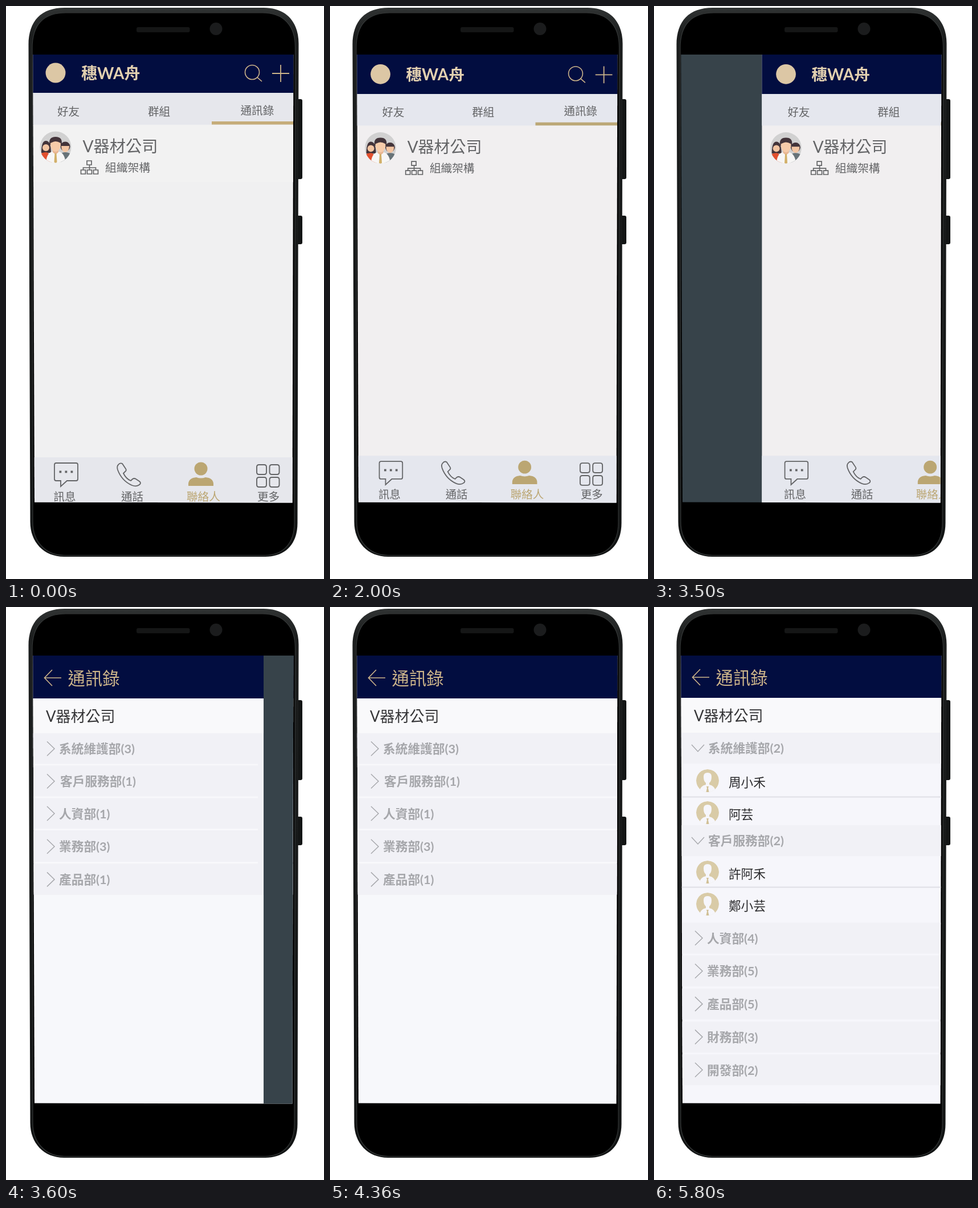
These frames come from a looping animation (558x1003 px, 6800 ms). An HTML page:

```html
<!DOCTYPE html>
<html lang="zh-Hant">
<head>
<meta charset="utf-8">
<title>通訊錄</title>
<style>
html, body { margin: 0; width: 100%; height: 100%; overflow: hidden; background: #fff; }
svg { display: block; width: 558px; height: 1003px; }
text { font-family: Lato, "Noto Sans CJK TC", "Noto Sans CJK", sans-serif; }
</style>
</head>
<body>
<svg viewBox="0 0 558 1003">
  <defs>
    <clipPath id="glass"><path d="M47.3 85H504.3L502.5 869.5L50 868.5Z"/></clipPath>
    <clipPath id="round"><circle cx="87" cy="247" r="27.5"/></clipPath>
    <clipPath id="badge"><circle r="20"/></clipPath>
    <linearGradient id="rim" x2="0" y2="1">
      <stop offset="0" stop-color="#303333"/>
      <stop offset=".05" stop-color="#1c1e1e"/>
      <stop offset="1" stop-color="#121414"/>
    </linearGradient>
  </defs>
  <path d="M510 163H517Q520 163 520 166V300Q520 303 517 303H510ZM510 367H517Q520 367 520 370V414Q520 417 517 417H510Z" fill="#131515"/>
  <path d="M39.5 68C39.5 26 62 3 103 3H452C492 3 513.5 28 513.5 66L511.5 905C511.5 942 490 964 455 964H102C66 964 42.5 938 42.5 903Z" fill="url(#rim)"/>
  <path d="M46 74C46 32 66 12 105 12H450C487 12 507.500 34 507.500 72L506 905C506 940 487 961.500 454 961.500H102C69 961.500 47 937 47 903Z" stroke="#343737" stroke-width="1.2"/>
  <rect x="229" y="37" width="93.500" height="9" rx="3" fill="#151616"/>
  <circle cx="368.500" cy="40" r="11" fill="#1b1c1d"/>
  <g id="view" clip-path="url(#glass)"></g>
</svg>
<script>
const NAVY = '#020d40', SAND = '#cdb58a', GOLD = '#bba672', GREY = '#636466', SLATE = '#37434a';
const LOOP = 6800;
const COMPANY = 'V器材公司';

const box = (x, y, w, h, fill, more = '') =>
  `<rect x="${x}" y="${y}" width="${w}" height="${h}" fill="${fill}" ${more}/>`;
const dot = (x, y, r, fill) => `<circle cx="${x}" cy="${y}" r="${r}" fill="${fill}"/>`;
const line = (d, color, width) =>
  `<path d="${d}" fill="none" stroke="${color}" stroke-width="${width}"/>`;
const shape = (d, fill) => `<path d="${d}" fill="${fill}"/>`;
const text = (x, y, size, fill, str, weight = 400) =>
  `<text x="${x}" y="${y}" font-size="${size}" font-weight="${weight}" fill="${fill}">${str}</text>`;

function team() {
  return `<g clip-path="url(#round)">${[
    dot(87, 247, 28, '#d1d1d1'),
    shape('M62 257Q62 236 70 236Q79 236 79 257Z', '#43343a'),
    shape('M58 276V262Q62 256 70 256Q78 256 80 276Z', '#e2502f'),
    dot(70, 248, 6, '#f3c5a2'),
    shape('M95 276V260Q98 256 104 256Q112 256 116 262V276Z', '#687378'),
    dot(104, 246, 8.5, '#43343a'),
    shape('M97 245H111Q111 255 104 256Q97 255 97 245Z', '#f3c5a2'),
    shape('M70 276Q71 257 81 255H93Q103 257 105 276Z', '#f7f6f5'),
    shape('M82 248H92V256L87 260L82 256Z', '#e9b693'),
    shape('M76.500 243Q74 229 87 229Q100 229 97.500 243Z', '#43343a'),
    shape('M78 240Q84 237 87 237Q91 237 96 240Q96 254 87 255Q78 254 78 240Z', '#f6cba9'),
    shape('M85.500 258H88.500L89.500 273L87 276L84.500 273Z', '#d2b069')
  ].join('')}</g>`;
}

function home(first) {
  const bar = first ? '#e6e7ec' : '#e5e7ee';
  const cell = (x, y) => `M${x + 4} ${y}h9q4 0 4 4v9q0 4-4 4h-9q-4 0-4-4v-9q0-4 4-4z`;
  const node = (x, y) => `M${x} ${y}h8v7h-8z`;
  return [
    box(44.5, 80, 520, 800, first ? '#f0f0f1' : '#f1eff0'),
    first ? box(44.5, 208, 520, 100, '#f2f2f2') : '',
    box(44.5, 70, 520, 82, NAVY),
    dot(87, 117, 17.5, '#dcc7a5'),
    text(132, 128, 28, '#e2d0b0', '穗WA舟', 700),
    line('M444.500 116a12.500 12.500 0 1 1-25 0a12.500 12.500 0 1 1 25 0M440.800 124.800L449 132', SAND, 1.6),
    line('M467 118H497M482 103V133', SAND, 1.8),
    box(44.5, 152, 520, 55.7, bar),
    box(361, 202, 200, 5.5, first ? '#c6ad79' : '#bca877'),
    text(90, 191.5, 19.6, GREY, '好友'),
    text(249, 191.5, 19.6, GREY, '群組'),
    text(411.5, 189.5, 19.6, GREY, '通訊錄'),
    team(),
    text(134.5, 256, 28.2, GREY, COMPANY),
    line(node(142, 271) + node(131.5, 287) + node(142.5, 287) + node(153.5, 287) +
      'M146.500 278V287M135.500 287V283H157.500V287', GREY, 1.7),
    text(174, 290, 19.8, GREY, '組織架構'),
    box(44.5, 790, 520, 100, bar),
    line('M88 800H123Q126 800 126 803V828Q126 831 123 831H107L96 841V831H88Q85 831 85 828V803Q85 800 88 800Z', GREY, 1.8),
    [93.5, 103.5, 113.5].map(x => box(x, 813.5, 3.8, 3.8, GREY)).join(''),
    line('M197 803Q200 799 204 801L210 810Q212 813 209 815L206 818Q211 828 219 831L222 828Q225 826 228 828L234 832Q238 835 234 838Q229 842 221 839Q203 831 196 812Q194 806 197 803Z', GREY, 1.8),
    dot(342, 810, 11.5, GOLD),
    shape('M320 840V836Q321 826 334 825Q342 828 350 825Q363 826 364 836V840Z', GOLD),
    line(cell(440, 803) + cell(462.5, 803) + cell(440, 825) + cell(462.5, 825), GREY, 1.9),
    text(83.5, 865.5, 19.6, GREY, '訊息'),
    text(202, 865.5, 19.6, GREY, '通話'),
    text(317, 865.5, 19.6, GOLD, '聯絡人'),
    text(441, 865.5, 19.6, GREY, '更多')
  ].join('');
}

// The settled home screen sits slightly smaller than the first view.
const settled = dx => `<g transform="translate(${dx + 2.2} 3.2) scale(.9925)">${home(false)}</g>`;

function group(y, name, open, x = 93) {
  const mark = open ? `M66 ${y - 6}L77 ${y + 6}L88 ${y - 6}` : `M72 ${y - 12.5}L85 ${y}L72 ${y + 12.5}`;
  return box(40, y - 27, 470, 54, '#f1f1f6') + line(mark, '#a9aaae', 1.5) +
    text(x, y + 8.2, 21.7, '#a6a7ab', name, 700);
}

function person(y, nameY, name) {
  return `<g transform="translate(94 ${y})"><g clip-path="url(#badge)">` +
    dot(0, 0, 20, '#d9cba7') +
    shape('M-7 -7Q-7 -14 0 -14Q7 -14 7 -7Q7 1 3 4V7Q13 9 15 20H-15Q-13 9-3 7V4Q-7 1-7 -7Z', '#f6f6fb') +
    shape('M-2 10H2L1 13L2.500 20H-2.500L-1 13Z', '#d0bf95') +
    '</g></g>' + text(131, nameY + 8.2, 21.6, '#2b2b2d', name);
}

const rule = y => box(40, y - 1, 470, 2, '#dfdfe6');

function panel(bg, body, up = 0) {
  return box(40, 80, 470, 800, bg) +
    box(40, 80, 470, 80 - up, NAVY) +
    `<g transform="translate(0 ${-up})">` +
    line('M97 124H68M81 110L67.500 124L81 138', SAND, 1.6) +
    text(108.5, 135.5, 30.4, SAND, '通訊錄') +
    box(40, 160, 470, 61, '#f9f9fb') +
    text(70, 200.5, 26, '#343436', COMPANY) + '</g>' + body;
}

const list = (names, start) => names.map((n, i) => group(start + i * 57.7, n)).join('');
const rest = ['人資部(4)', '業務部(5)', '產品部(5)', '財務部(3)', '開發部(2)'];
const pair = (a, b) => person(...a) + person(...b);

function closed(dividerEnd) {
  const dividers = [276, 333, 389.5, 447.5].map(y => box(40, y - 1.5, dividerEnd - 40, 3, '#f8f8fb'));
  return panel('#f7f8fb', box(40, 221, 470, 282, '#f1f1f6') +
    group(248, '系統維護部(3)') + group(305, '客戶服務部(1)', false, 95) +
    list(['人資部(1)', '業務部(3)', '產品部(1)'], 361.5) + dividers.join(''));
}

function oneOpen() {
  return panel('#f6f6fb',
    group(248, '系統維護部(2)', true, 95) +
    pair([305, 307.5, '周小禾'], [359, 361.5, '阿芸']) + rule(333.5) +
    group(410.5, '客戶服務部(2)', false, 95) + list(rest, 467));
}

function twoOpen() {
  return panel('#f6f6fb',
    group(247, '系統維護部(2)', true, 95) +
    pair([304, 306.5, '周小禾'], [360, 362.5, '阿芸']) + rule(332.5) +
    group(409, '客戶服務部(2)', true, 95) +
    pair([464, 466.5, '許阿禾'], [520, 522.5, '鄭小芸']) + rule(490.5) +
    list(rest, 579.5), 1);
}

const scenes = [
  [0, () => home(true)],
  [2000, () => settled(0)],
  [3500, () => box(40, 80, 470, 800, SLATE) + settled(143)],
  [3600, () => closed(442) + box(452, 80, 60, 800, SLATE)],
  [3700, () => closed(510)],
  [4800, oneOpen],
  [5800, twoOpen]
];

const view = document.getElementById('view');
let shown = null;

function draw(ms) {
  const t = ms % LOOP;
  const scene = scenes.filter(s => s[0] <= t).pop();
  if (scene !== shown) {
    shown = scene;
    view.innerHTML = scene[1]();
  }
}

function tick() {
  draw(performance.now());
  requestAnimationFrame(tick);
}
tick();
</script>
</body>
</html>
```
